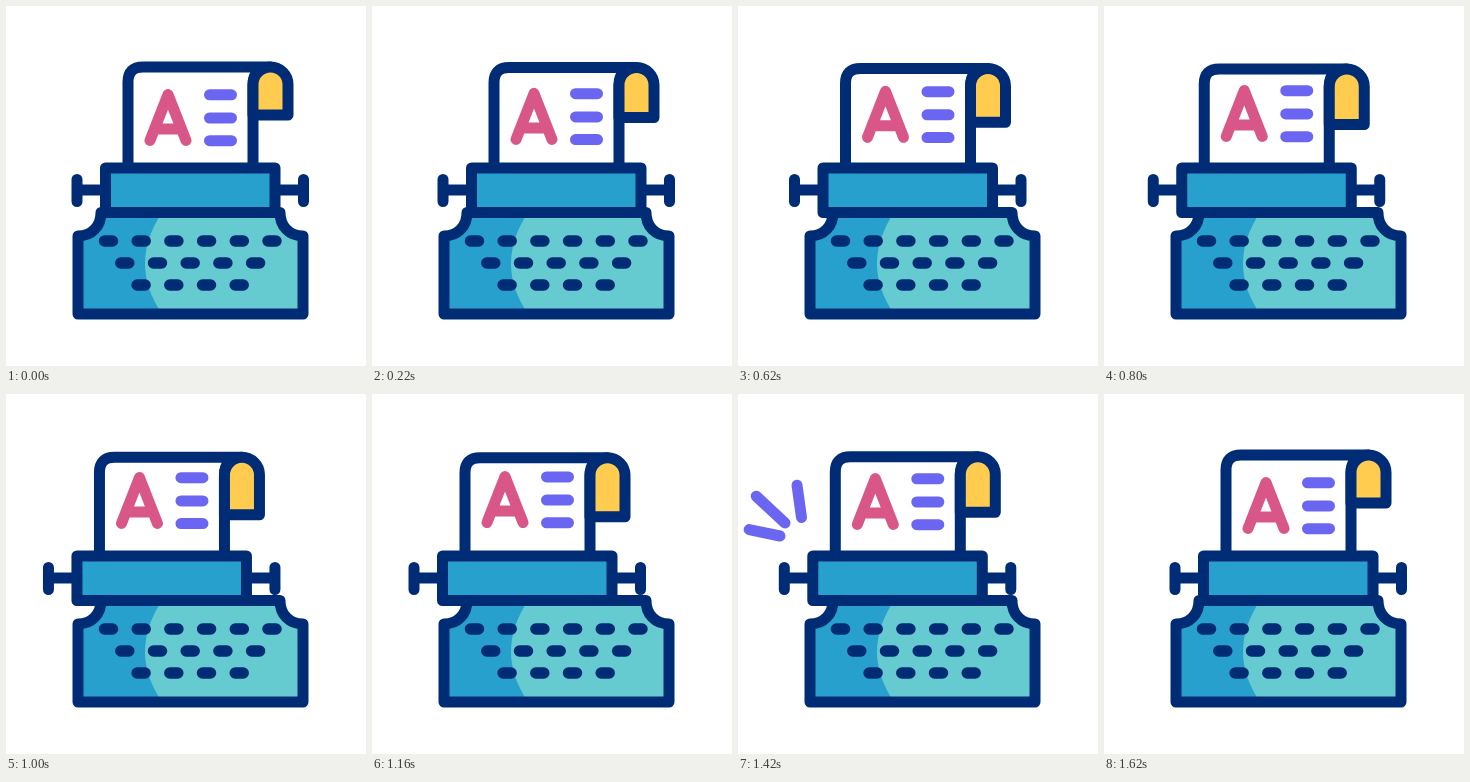
An HTML page for the animation above (1.82 s loop, 360x360 px).

```html
<!DOCTYPE html>
<html lang="en">
<head>
<meta charset="utf-8">
<title>Typewriter</title>
<style>
  html, body { margin: 0; width: 100%; height: 100%; overflow: hidden; background: #fff; }
  svg { display: block; width: 100%; height: 100%; }
  .ink { stroke: #002c76; }
  .pink { stroke: #d95788; }
  .violet { stroke: #6a66f1; }
</style>
</head>
<body>
<svg viewBox="0 0 360 360" fill="none" stroke-width="11" stroke-linecap="round" stroke-linejoin="round">
  <g id="carriage">
    <path id="sheet" class="ink" fill="#fff"/>
    <path id="flap" class="ink" fill="#ffcc50"/>
    <g id="print">
      <path class="pink" d="M144 134.5L162 88.5L180 134.5M150 123H174"/>
      <path class="violet" d="M203.5 88.8H225.5M203.5 112H225.5M203.5 134.7H225.5"/>
    </g>
    <path class="ink" d="M71 184H99M71 173.5V195.5M269 184H297M297.5 173.5V195.5"/>
    <path class="ink" fill="#28a0cd" d="M99.5 162H269V206.5H99.5Z"/>
  </g>
  <path id="base" fill="#66cbd0"/>
  <path fill="#28a0cd" d="M72 308V230C86 230 95 220 95 206.5H156Q122 258 156 308Z"/>
  <path id="rim" class="ink"/>
  <path id="keys" class="ink" stroke-width="11.5"/>
  <path id="rays" class="violet"/>
</svg>
<script>
const LOOP = 1820, TICK = 20;
const STEP = 7.25, FIRST = 220, GAP = 240, STRIKES = 4, SLIDE = 80;
const FEED_END = 1180, BACK = 1320, HOME = 1620;
const RAYS = [[42, 142, 11, 135.5], [47, 129, 18, 102], [63.5, 123.5, 59, 91]];

const $ = id => document.getElementById(id);
const setPath = (id, d) => $(id).setAttribute('d', d);
const shift = (id, x, y) => $(id).setAttribute('transform', `translate(${x} ${y})`);
const ramp = (t, a, b) => Math.min(1, Math.max(0, (t - a) / (b - a)));
const smooth = p => p < .5 ? 4 * p ** 3 : 1 - 4 * (1 - p) ** 3;
const easeOut = p => 1 - (1 - p) ** 2;

const shell = 'M72 308V230C86 230 95 220 95 206.5H274C274 220 283 230 297 230V308Z';
setPath('base', shell);
setPath('rim', shell);

let keys = '';
[6, 5, 4].forEach((count, row) => {
  for (let i = 0; i < count; i++) {
    keys += `M${98.5 + row * 16.3 + i * 32.7} ${235 + row * 22}h8`;
  }
});
setPath('keys', keys);

function carriageX(t) {
  let steps = 0;
  for (let i = 0; i < STRIKES; i++) {
    const start = FIRST + i * GAP;
    steps += smooth(ramp(t, start, start + SLIDE));
  }
  return -STEP * steps * (1 - smooth(ramp(t, BACK, HOME)));
}

function drawRays(t) {
  const head = 1.14 * easeOut(ramp(t, 1240, 1520));
  const tail = 1.14 * ramp(t, 1420, 1600);
  let d = '';
  if (head > tail) {
    for (const [x, y, u, v] of RAYS) {
      const at = p => `${x + (u - x) * p} ${y + (v - y) * p}`;
      d += `M${at(tail)}L${at(head)}`;
    }
  }
  setPath('rays', d);
}

function draw(t) {
  const feed = ramp(t, 0, FEED_END) * (1 - ramp(t, BACK, HOME));
  const top = 61 + 2.8 * feed;
  const hem = 109 + 14 * feed;
  shift('carriage', carriageX(t), 0);
  shift('print', 0, -6 * feed);
  setPath('sheet', `M122 162V${top + 15}Q122 ${top} 137 ${top}H264.5Q247 ${top} 247 ${top + 18}V162`);
  setPath('flap', `M247 ${hem}V${top + 17.5}A17.5 17.5 0 0 1 282 ${top + 17.5}V${hem}Z`);
  drawRays(t);
}

function frame() {
  const t = performance.now() % LOOP;
  draw(Math.floor(t / TICK) * TICK);
  requestAnimationFrame(frame);
}
frame();
</script>
</body>
</html>
```
